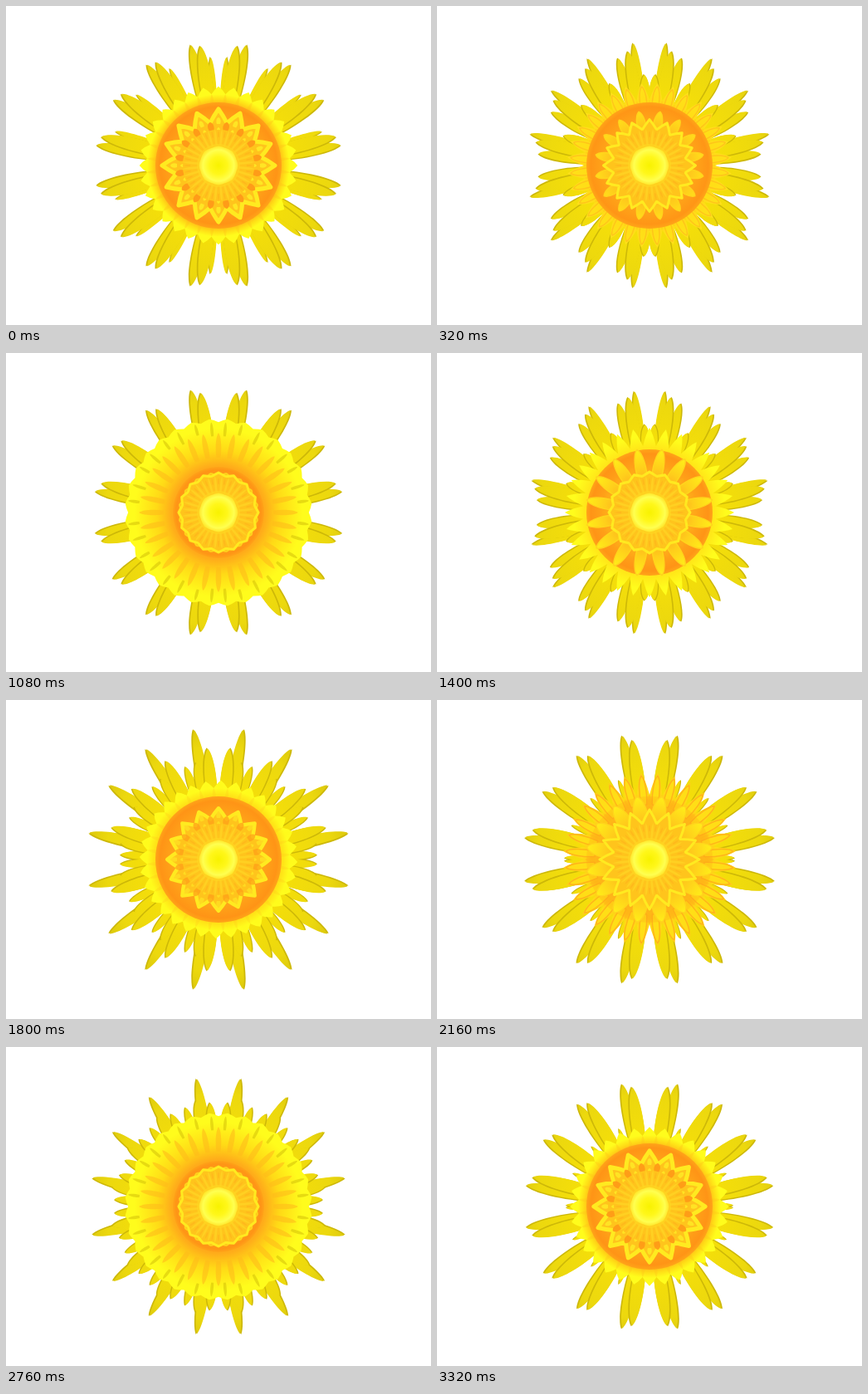
An HTML page that plays this animation: 512x384 px, repeating every 3.36 s.

```html
<!DOCTYPE html>
<html lang="en">
<head>
<meta charset="utf-8">
<title>Kaleidoscope flower</title>
<style>
  html, body { margin: 0; width: 100%; height: 100%; overflow: hidden; background: #fff; }
  svg { display: block; width: 100vw; height: 100vh; }
</style>
</head>
<body>
<svg viewBox="0 0 512 384">
  <defs>
    <radialGradient id="skirtFill" gradientUnits="userSpaceOnUse" cx="0" cy="0" r="110">
      <stop id="skirtRoot" stop-color="#ffac1a"/>
      <stop id="skirtBody" stop-color="#ffda16"/>
      <stop id="skirtEdge" offset=".9"/>
    </radialGradient>
    <radialGradient id="discFill">
      <stop offset=".5" stop-color="#ffb41c"/>
      <stop offset=".93" stop-color="#ff9416"/>
      <stop offset="1" stop-color="#ffa418"/>
    </radialGradient>
    <radialGradient id="petalFill" gradientUnits="userSpaceOnUse" cx="0" cy="0" r="160">
      <stop offset=".55" stop-color="#f4de0a"/>
      <stop offset=".85" stop-color="#ecd80e"/>
      <stop offset="1" stop-color="#dcc80c"/>
    </radialGradient>
    <radialGradient id="bulbFill" gradientUnits="userSpaceOnUse" cx="0" cy="0" r="78">
      <stop offset=".6" stop-color="#ffc41c"/>
      <stop offset="1" stop-color="#fff018"/>
    </radialGradient>
    <radialGradient id="heartFill">
      <stop offset="0" stop-color="#f8f200"/>
      <stop offset=".45" stop-color="#fff71a"/>
      <stop offset=".8" stop-color="#ffff50"/>
      <stop offset="1" stop-color="#ffe52a"/>
    </radialGradient>
  </defs>
  <g id="flower" transform="translate(256 192)" stroke-linejoin="round"></g>
</svg>
<script>
const LOOP = 3360, STEP = 40;
const BLOOM = LOOP / 2, DRIFT = LOOP / 3;
const SECTOR = 22.5, TOOTH = SECTOR / 2;
const byId = id => document.getElementById(id);
const flower = byId('flower');

function set(node, attrs) {
  for (const name in attrs) node.setAttribute(name, attrs[name]);
}
function add(tag, attrs) {
  const node = document.createElementNS('http://www.w3.org/2000/svg', tag);
  set(node, attrs);
  flower.append(node);
  return node;
}

// Smooth bump in the bloom cycle: 1 at the centre, 0 from the width outward.
function near(t, centre, width) {
  const turn = ((t - centre) % BLOOM + BLOOM) % BLOOM;
  const x = Math.max(0, 1 - Math.min(turn, BLOOM - turn) / width);
  return x * x * (3 - 2 * x);
}

// Yellow at 0, orange at 1.
function warm(k) {
  return `rgb(255,${Math.round(252 - 86 * k)},${Math.round(28 - 4 * k)})`;
}

// Angles are clockwise from the top; side is an offset across the radius.
function point(r, angle, side = 0) {
  const a = angle * Math.PI / 180, s = Math.sin(a), c = Math.cos(a);
  return `${(r * s + side * c).toFixed(2)} ${(-r * c + side * s).toFixed(2)} `;
}

function petal(angle, r0, r1, w) {
  const p = (k, side) => point(r0 + (r1 - r0) * k, angle, side * w);
  return `M${p(0, -.8)}C${p(.4, -1.3)}${p(.88, -1)}${p(1, 0)}` +
         `C${p(.88, 1)}${p(.4, 1.3)}${p(0, .8)}Z`;
}

function ring(n, offset, r0, r1, w) {
  let d = '';
  for (let i = 0; i < n; i++) d += petal(offset + i * 360 / n, r0, r1, w);
  return d;
}

// One petal repeated four times in a quadrant, mirrored over both axes.
function mirrored(angle, r0, r1, w) {
  let d = '';
  for (let i = 0; i < 4; i++) {
    const a = angle + SECTOR * i;
    for (const b of [a, -a, 180 - a, 180 + a]) d += petal(b, r0, r1, w);
  }
  return d;
}

function star(n, offset, valley, tip, bulge = 0) {
  const half = 180 / n, shoulder = valley + (tip - valley) * (.5 + bulge);
  let d = 'M' + point(valley, offset - half);
  for (let i = 0; i < n; i++) {
    const a = offset + i * 2 * half;
    d += `Q${point(shoulder, a - half * .5)}${point(tip, a)}` +
         `Q${point(shoulder, a + half * .5)}${point(valley, a + half)}`;
  }
  return d + 'Z';
}

// Age counts drift cycles: petals grow while crossing their sector, then sink.
const longPetal = age => ({
  angle: 4.5 + 8.8 * age + .75 * (1 - Math.cos(2 * Math.PI * age)),
  tip: age < .77 ? 161 - 50 * (.77 - age) ** 2 : 161 - 50 * (age - .77),
  width: 7.5 - 4.2 * (age - .9) ** 2
});
const shortPetal = age => ({
  angle: 1.6 + 7.4 * age,
  tip: 146 - 70 * (age - 1) ** 2,
  width: 8 - 4 * (age - 1) ** 2
});

const outer = [];
for (const shape of [longPetal, shortPetal])
  for (const shift of [1, 0])
    outer.push({
      shape, shift,
      dark: add('path', { fill: '#cdb808' }),
      light: add('path', { fill: 'url(#petalFill)' })
    });

const skirt = add('path', { fill: 'url(#skirtFill)' });
const creases = add('path', {});
const ridges = add('path', { fill: '#ffe016', stroke: '#ffb01a', 'stroke-width': 1.5 });
const peeks = add('path', { fill: '#d8c60a' });
const disc = add('circle', { fill: 'url(#discFill)' });
const bulbs = add('path', { fill: 'url(#bulbFill)', stroke: '#ffd41c', 'stroke-width': 1.5 });
const lace = add('path', { fill: '#ffc41c', stroke: '#ffea20' });
const beads = add('path', { d: ring(16, TOOTH, 43, 53, 3.6), fill: '#ff9c18' });
const pearls = add('path', { d: ring(16, 0, 40, 46, 2) + ring(16, 0, 50, 58, 2.6), fill: '#ffe524' });
add('circle', { r: 43, fill: '#ffc41c' });
add('path', { d: ring(32, TOOTH / 2, 24, 44, 1.3), fill: '#ffd022' });
add('path', { d: ring(32, 0, 34, 42, .8), fill: '#ffb81c' });
add('circle', { r: 26, fill: '#ffd622', opacity: .7 });
add('path', { d: star(4, 45, 22.5, 24, .5) + star(8, 0, 22.5, 23.5, .5), fill: 'url(#heartFill)' });

function drawOuter(t) {
  for (const { shape, shift, dark, light } of outer) {
    const { angle, tip, width } = shape(t % DRIFT / DRIFT + shift);
    const d = tip > 90 && angle < SECTOR ? mirrored(angle, 70, tip, width) : '';
    set(dark, { d });
    set(light, { d: d && mirrored(angle - .5, 70, tip - 1, width * .92) });
  }
}

function drawBloom(t) {
  const lattice = near(t, 0, 320);
  const petals = near(t, 480, 380);
  const veil = near(t, 480, 180);
  const rim = near(t, 1080, 300);
  const gaps = near(t, 1400, 300);

  const tip = 105 + 10 * Math.cos(2 * Math.PI * (t - 900) / BLOOM);
  const valley = tip - 9 - 18 * petals - 13 * gaps + 5 * rim;
  const offset = TOOTH / 2 * (1 - Math.min(1, lattice + gaps));
  set(byId('skirtFill'), { r: tip });
  set(byId('skirtRoot'), { offset: .5 + .26 * lattice });
  set(byId('skirtBody'), { offset: .66 + .17 * lattice + .12 * petals });
  set(byId('skirtEdge'), { 'stop-color': warm(.55 * petals) });
  set(skirt, { d: star(32, offset, valley, tip, .15) });
  set(creases, {
    d: ring(32, offset + TOOTH / 2, 66, valley - 13 * rim, 2 + 1.2 * rim),
    fill: warm(.75),
    opacity: .3 * lattice + .55 * petals + .6 * rim
  });
  set(ridges, { d: ring(32, offset, 66, tip - 4, 4), opacity: .85 * petals });
  set(peeks, {
    d: mirrored(4.6, 92, tip - 4, 1.8) + mirrored(15, 96, tip - 3, 1.8),
    opacity: .6 * rim
  });

  set(disc, { r: 76 - 21 * rim, opacity: 1 - .75 * veil });
  set(bulbs, {
    d: ring(16, TOOTH, 38, 48 + 29 * (petals + gaps), 5 + 3 * veil + gaps)
  });
  set(lace, {
    d: star(16, 0, 44 + 8 * lattice, 48 + 20 * lattice + 12 * petals),
    'stroke-width': 3 + 2 * lattice
  });
  set(beads, { opacity: lattice });
  set(pearls, { opacity: lattice });
}

const start = performance.now();
function frame() {
  const t = Math.floor((performance.now() - start) / STEP) * STEP % LOOP;
  drawOuter(t);
  drawBloom(t);
  requestAnimationFrame(frame);
}
frame();
</script>
</body>
</html>
```
